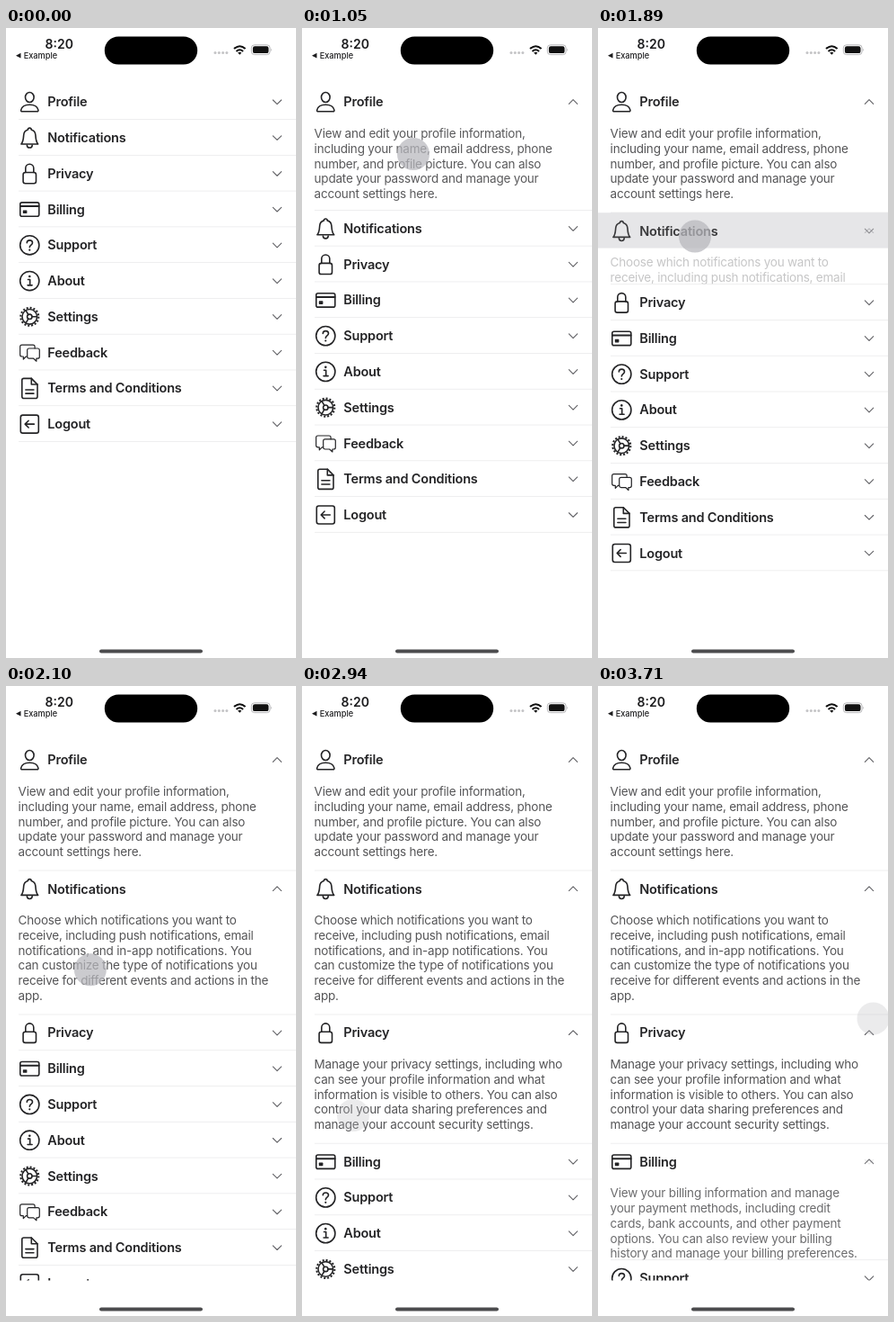
An HTML page for the animation above (3.77 s loop, 323 by 700 pixels).

```html
<!DOCTYPE html>
<html lang="en">
<head>
<meta charset="utf-8">
<title>Expandable settings list</title>
<style>
  html, body { margin: 0; width: 100%; height: 100%; overflow: hidden; background: #fff; }
  svg { display: block; width: 100vw; height: 100vh; font-family: Inter, "Liberation Sans", sans-serif; }
  .label { font-size: 14.5px; font-weight: 600; letter-spacing: -.2px; fill: #242426; }
  .body { font-size: 13.5px; letter-spacing: -.21px; fill: #555557; }
  .icon { fill: none; stroke: #242426; stroke-width: 1.6; stroke-linecap: round; stroke-linejoin: round; }
  .icon .solid { fill: #242426; stroke: none; }
  .chev { fill: none; stroke: #626266; stroke-width: 1.1; stroke-linecap: round; stroke-linejoin: round; }
</style>
</head>
<body>
<svg id="stage" viewBox="0 0 323 700" preserveAspectRatio="none">
  <defs><clipPath id="view"><rect y="50" width="323" height="610.5"/></clipPath></defs>
  <rect width="323" height="700" fill="#fff"/>
  <g id="list" clip-path="url(#view)"></g>

  <g id="status">
    <text x="43.6" y="23.2" font-size="14" font-weight="600" fill="#1c1c1e">8:20</text>
    <path d="M11 30.7 L16.5 27.8 V33.6 Z" fill="#1c1c1e"/>
    <text x="19.7" y="34" font-size="9.2" font-weight="500" fill="#1c1c1e">Example</text>
    <rect x="109.8" y="9.6" width="103.4" height="30.8" rx="15.4"/>
    <g fill="#c4c4c6">
      <circle cx="233" cy="27.5" r="1.5"/><circle cx="237.3" cy="27.5" r="1.5"/>
      <circle cx="241.6" cy="27.5" r="1.5"/><circle cx="245.9" cy="27.5" r="1.5"/>
    </g>
    <g fill="none" stroke="#111" stroke-width="2">
      <path d="M254 23.1 Q260.3 17.4 266.6 23.1"/><path d="M256.5 25.9 Q260.3 22.6 264.1 25.9"/>
    </g>
    <path d="M258.2 27.6 Q260.3 26 262.4 27.6 L260.3 29.8 Z" fill="#111"/>
    <rect x="273.3" y="18.8" width="20.8" height="10.8" rx="3.4" fill="none" stroke="#aeaeb0" stroke-width=".9"/>
    <rect x="274.9" y="20.3" width="17.6" height="7.8" rx="2.2" fill="#111"/>
    <path d="M295.3 22.5 q1.6 1.7 0 3.4 z" fill="#aeaeb0"/>
  </g>
  <rect x="104" y="690.4" width="115" height="4.2" rx="2.1" fill="#4c4c4e"/>
  <circle id="touch" r="18" fill="#b8b8bd"/>
</svg>

<script>
const LOOP = 3770, ROW = 39.77, TOP = 62, LINE = 16.75, OPEN_MS = 300;

const ICONS = {
  person: '<ellipse cy="-5.2" rx="4.8" ry="5.5"/><path d="M-8.3 10.6 Q-9.8 10.6 -9.6 9 C-8.8 4.8 -4.6 3 0 3 S8.8 4.8 9.6 9 Q9.8 10.6 8.3 10.6 Z"/>',
  bell: '<path d="M-9.4 7 C-7 4.4 -6.9 1.2 -6.6 -3 C-6.3 -6.5 -4 -8.3 -1.9 -8.9 A1.9 1.9 0 0 1 1.9 -8.9 C4 -8.3 6.3 -6.5 6.6 -3 C6.9 1.2 7 4.4 9.4 7 Z"/><path d="M-2.9 8.2 A2.9 2.9 0 0 0 2.9 8.2"/>',
  lock: '<rect x="-7.2" y="-1.2" width="14.4" height="12.2" rx="2.4"/><path d="M-4.5 -1.2 V-6 A4.5 4.5 0 0 1 4.5 -6 V-1.2"/>',
  card: '<rect x="-10.5" y="-7.6" width="21" height="15.4" rx="2"/><path d="M-10.3 -3.4 H10.3" stroke-width="2"/><rect class="solid" x="-7.5" y="1" width="4.6" height="3.6" rx=".6"/>',
  help: '<circle r="10.6"/><path d="M-3 -2.6 C-3 -6.4 3.2 -6.4 3.2 -2.6 C3.2 -.2 0 -.2 0 2.3"/><circle class="solid" cy="5.4" r="1.1"/>',
  info: '<circle r="10.6"/><path d="M-1.8 -1.6 H.4 V4.8 M-2.2 4.8 H2.8"/><circle class="solid" cy="-5" r="1.3"/>',
  gear: '<circle r="8.3"/><circle r="10" stroke-width="2.1" stroke-dasharray="2 1.927" stroke-linecap="butt"/><circle r="2.7"/><path d="M2.7 0 H8 M-1.4 -2.3 L-4.2 -7 M-1.4 2.3 L-4.2 7"/>',
  chat: '<g stroke-width="1.2"><path d="M-2.6 4.4 H-4 L-7 7.4 V4.4 H-8.6 A2 2 0 0 1 -10.6 2.4 V-6.4 A2 2 0 0 1 -8.6 -8.4 H3.8 A2 2 0 0 1 5.8 -6.4 V-4.6"/><path d="M-.6 -4.6 H9 A2 2 0 0 1 11 -2.6 V4.6 A2 2 0 0 1 9 6.6 H7.6 V9.6 L4.4 6.6 H-.6 A2 2 0 0 1 -2.6 4.6 V-2.6 A2 2 0 0 1 -.6 -4.6 Z"/></g>',
  page: '<path d="M-8.5 -9 A2 2 0 0 1 -6.5 -11 H2 L8.7 -4.3 V9.2 A2 2 0 0 1 6.7 11.2 H-6.5 A2 2 0 0 1 -8.5 9.2 Z"/><path d="M2 -11 V-4.3 H8.7 M-4.4 1.6 H4.6 M-4.4 5.8 H4.6"/>',
  exit: '<rect x="-10" y="-10" width="20" height="20" rx="2.4"/><path d="M5 0 H-5 M-1.2 -3.9 L-5.1 0 L-1.2 3.9"/>'
};

// icon, label, moment of opening, body lines
const ROWS = [
  ['person', 'Profile', 784, 'View and edit your profile information,|including your name, email address, phone|number, and profile picture. You can also|update your password and manage your|account settings here.'],
  ['bell', 'Notifications', 1770, 'Choose which notifications you want to|receive, including push notifications, email|notifications, and in-app notifications. You|can customize the type of notifications you|receive for different events and actions in the|app.'],
  ['lock', 'Privacy', 2640, 'Manage your privacy settings, including who|can see your profile information and what|information is visible to others. You can also|control your data sharing preferences and|manage your account security settings.'],
  ['card', 'Billing', 3486, 'View your billing information and manage|your payment methods, including credit|cards, bank accounts, and other payment|options. You can also review your billing|history and manage your billing preferences.'],
  ['help', 'Support'], ['info', 'About'], ['gear', 'Settings'],
  ['chat', 'Feedback'], ['page', 'Terms and Conditions'], ['exit', 'Logout']
];

// time, x, y, strength of the touch dot
const TOUCH = [
  [200, 132.5, 115, 0], [410, 132.5, 111.5, 1], [550, 132.5, 111.5, 1],
  [720, 133.5, 99, 1], [850, 133.5, 99, 1], [1050, 124, 140, 1],
  [1260, 104, 236, 1], [1470, 99.5, 260, 1], [1610, 108, 231.5, 1],
  [1900, 108, 231.5, 1], [2240, 84, 374, 1], [2450, 76, 387, 1],
  [2680, 76, 388, 1], [2800, 70, 420, .9], [2940, 57, 477, .4],
  [3150, 60, 522, .9], [3360, 64, 528, 1], [3500, 66, 527, 1],
  [3710, 306.5, 369.5, .4]
];

const clamp = v => Math.max(0, Math.min(1, v));
const smooth = v => v * v * (3 - 2 * v);
const $ = id => document.getElementById(id);

// cubic-bezier(.42, 0, .58, 1)
function ease(x) {
  let lo = 0, hi = 1;
  for (let i = 0; i < 20; i++) {
    const s = (lo + hi) / 2, r = 1 - s;
    if (1.26 * s * r * r + 1.74 * s * s * r + s * s * s < x) lo = s; else hi = s;
  }
  return smooth(lo);
}

function make(parent, tag, attrs = {}, inner = '') {
  const el = document.createElementNS('http://www.w3.org/2000/svg', tag);
  set(el, attrs);
  el.innerHTML = inner;
  return parent.appendChild(el);
}

function set(el, attrs) {
  for (const k in attrs) el.setAttribute(k, attrs[k]);
}

const rows = ROWS.map(([icon, label, start, body], i) => {
  const g = make($('list'), 'g');
  const row = { g, start, full: 0 };
  row.glow = make(g, 'rect', { width: 323, height: 39.4, fill: '#d1d1d5' });
  row.head = make(g, 'g', {},
    `<g class="icon" transform="translate(26.3 20.2)">${ICONS[icon]}</g>` +
    `<text class="label" x="46.3" y="25.3">${label}</text>`);
  row.down = make(g, 'path', { class: 'chev', d: 'M297.3 18 L302 22.7 L306.7 18' });
  row.up = make(g, 'path', { class: 'chev', d: 'M297.3 22.3 L302 17.6 L306.7 22.3' });
  if (body) {
    const lines = body.split('|');
    row.full = lines.length * LINE + 19.7;
    const clip = make($('stage').querySelector('defs'), 'clipPath', { id: 'clip' + i });
    row.clip = make(clip, 'rect', { y: ROW, width: 323, height: 0 });
    row.text = make(make(g, 'g', { 'clip-path': `url(#clip${i})` }), 'g', { class: 'body' },
      lines.map((s, k) => `<text x="13.6" y="${60 + k * LINE}">${s}</text>`).join(''));
  }
  row.rule = make(g, 'rect', { x: 14, width: 309, height: .8, fill: '#eaeaeb' });
  return row;
});

function glowAt(dt) {
  return clamp((dt + 40) / 50) * (1 - smooth(clamp((dt - 40) / 170)));
}

function touchAt(t) {
  const n = TOUCH.findIndex(k => k[0] > t);
  if (n === 0) return TOUCH[0];
  if (n < 0) return TOUCH[TOUCH.length - 1];
  const a = TOUCH[n - 1], b = TOUCH[n];
  const p = (t - a[0]) / (b[0] - a[0]);
  return a.map((v, i) => v + (b[i] - v) * p);
}

function draw(t) {
  let y = TOP;
  for (const r of rows) {
    const dt = r.full ? t - r.start : -1e4;
    const p = ease(clamp(dt / OPEN_MS));
    const glow = glowAt(dt), h = r.full * p;
    set(r.g, { transform: `translate(0 ${y.toFixed(2)})` });
    set(r.glow, { opacity: glow });
    set(r.head, { opacity: 1 - .2 * glow });
    set(r.down, { opacity: 1 - p });
    set(r.up, { opacity: p });
    if (r.text) {
      set(r.clip, { height: h });
      set(r.text, { opacity: p });
    }
    set(r.rule, { y: ROW - .6 + h });
    y += ROW + h;
  }
  const [, cx, cy, a] = touchAt(t);
  set($('touch'), { cx, cy, opacity: .72 * a });
}

const snap = t => t < 210 ? 0 : 210 + Math.floor((t - 210) / 70) * 70;

const begin = performance.now();
function tick() {
  draw(snap((performance.now() - begin) % LOOP));
  requestAnimationFrame(tick);
}
draw(0);
tick();
</script>
</body>
</html>
```
